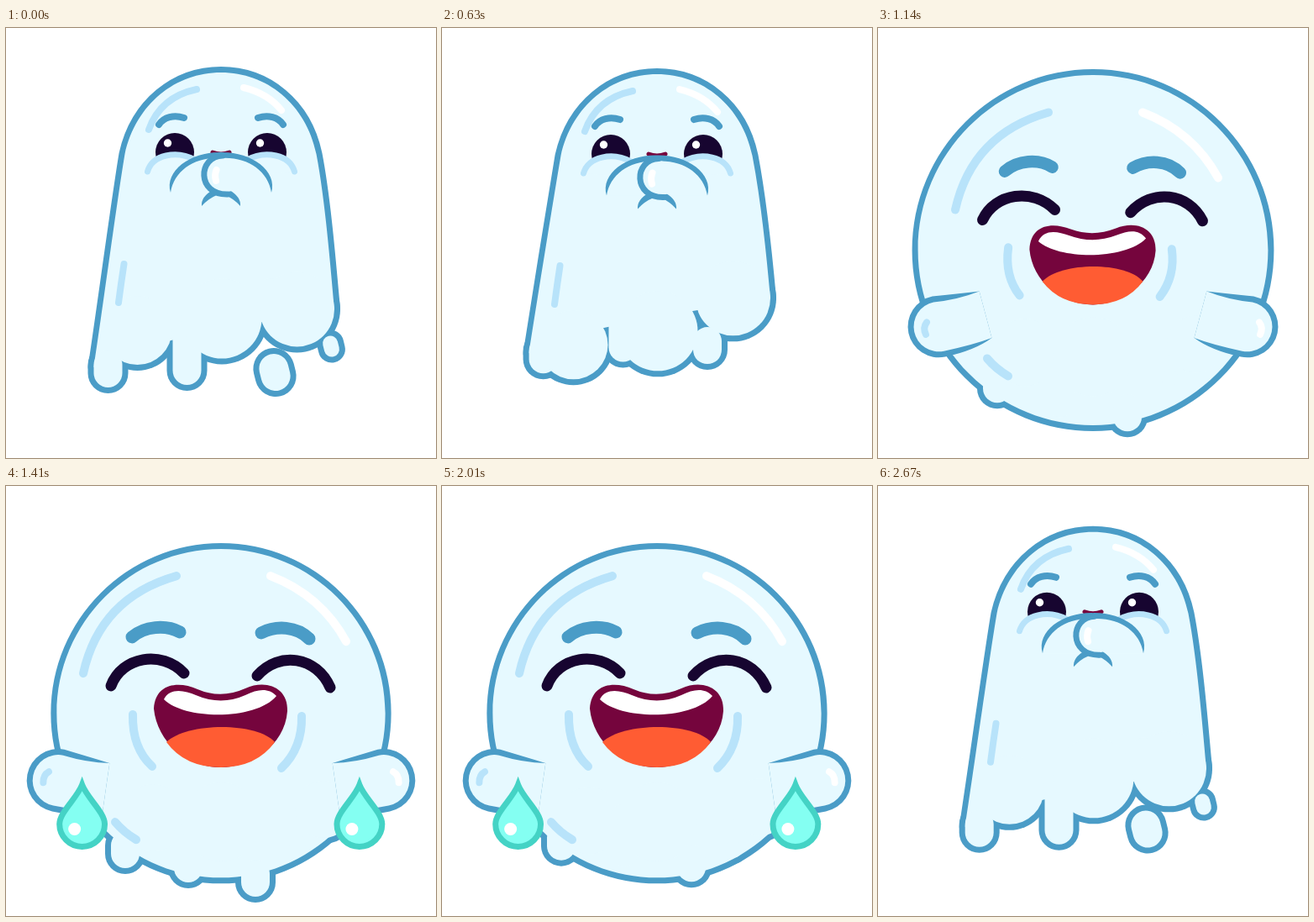
An HTML page with a canvas that plays this animation: 512 by 512 pixels, repeating every 2.7 s.

```html
<!DOCTYPE html>
<html lang="en">
<head>
<meta charset="utf-8">
<title>Giggling ghost</title>
<style>
html, body { margin: 0; width: 100%; height: 100%; overflow: hidden; background: #fff; }
canvas { display: block; width: 512px; height: 512px; }
</style>
</head>
<body>
<canvas id="stage" width="512" height="512"></canvas>
<script>
const ctx = document.getElementById('stage').getContext('2d');
const LOOP = 2700, LAUGH = 300;
const SKIN = '#e6f9ff', LINE = '#4a9cc7', SHADE = '#b8e3fa', INK = '#170530',
      WINE = '#75053d', TONGUE = '#ff5c33', WHITE = '#fff';

const lerp = (a, b, k) => a + (b - a) * k;
const smooth = k => k * k * (3 - 2 * k);
const ramp = (t, a, b) => smooth(Math.min(1, Math.max(0, (t - a) / (b - a))));

function track(t, times, values, ease = smooth) {
  if (t <= times[0]) return values[0];
  const i = times.findIndex(v => v > t);
  if (i < 0) return values[values.length - 1];
  return lerp(values[i - 1], values[i], ease((t - times[i - 1]) / (times[i] - times[i - 1])));
}

// Blend two path strings that share the same commands.
function mix(a, b, k) {
  const number = /-?[\d.]+/g, target = b.match(number);
  let i = 0;
  return a.replace(number, v => lerp(+v, +target[i++], k));
}

function stroke(path, color, width) {
  ctx.strokeStyle = color;
  ctx.lineWidth = width;
  ctx.stroke(new Path2D(path));
}
function fill(path, color) {
  ctx.fillStyle = color;
  ctx.fill(new Path2D(path));
}
function dot(x, y, r, color) {
  ctx.fillStyle = color;
  ctx.beginPath();
  ctx.arc(x, y, r, 0, 7);
  ctx.fill();
}
function at(x, y, draw) {
  ctx.save();
  ctx.translate(x, y);
  draw();
  ctx.restore();
}
function bothSides(draw) {
  draw(false);
  ctx.save();
  ctx.translate(512, 0);
  ctx.scale(-1, 1);
  draw(true);
  ctx.restore();
}

// Blobs of the melting hem: ghost x, radius, heights; ball x, radius, heights; neck length.
const HEM = [
  { g: [121.5, 17], gy: [411, 395, 390], b: [142, 17], by: [438, 430, 427], neck: 10 },
  { g: [156.5, 41], gy: [360, 367, 382], b: [175, 40], by: [395, 395, 402], neck: 0 },
  { g: [215.5, 17], gy: [408, 384, 374], b: [217, 17], by: [455, 440, 430], neck: 40 },
  { g: [257, 47.5], gy: [346, 373, 347], b: [256, 47], by: [400, 400, 400], neck: 0 },
  { g: [316, 17], gy: [325, 386, 377], b: [297, 17], by: [472, 457, 451], neck: 10 },
  { g: [346.5, 44.5], gy: [335, 322, 318], b: [378, 34], by: [385, 378, 388], neck: 0 }
];
const ghostY = (t, [a, b, c]) => track(t, [0, 360, 870, 2400], [a, b, c, a]);
const ballY = (t, ys) => track(t, [1410, 1800, 2250], ys);
const sag = bob => bob * .45;

function ghostPath(bob, left, right) {
  const top = 53 + bob, brow = 90 + bob, side = 150 + bob, x = 104.5 - sag(bob);
  return `M141.5 ${side} C155 ${brow} 202 ${top} 256 ${top} C310 ${top} 357 ${brow} 369.5 ${side}
    C380 ${side + 55} 386 ${right - 55} 391 ${right} C340 ${right + 10} 160 ${left - 41} ${x} ${left - 7}
    C${x + 9} ${left - 65} 133 ${side + 50} 141.5 ${side}`;
}
function ballPath(cy, r) {
  const p = (x, y) => `${256 + x * r} ${cy + y * r}`;
  return `M${p(-1, 0)} C${p(-1, -.552)} ${p(-.552, -1)} ${p(0, -1)} C${p(.552, -1)} ${p(1, -.552)} ${p(1, 0)}
    C${p(1, .265)} ${p(.895, .52)} ${p(.707, .707)} C${p(.317, 1.098)} ${p(-.317, 1.098)} ${p(-.707, .707)}
    C${p(-.895, .52)} ${p(-1, .265)} ${p(-1, 0)}`;
}

// All parts are outlined first and filled afterwards, so they merge into one silhouette.
function drawBody(t, s) {
  const hang = h => ghostY(t, h.gy) + s.bob;
  const blobs = HEM.map((h, i) => {
    const y = lerp(hang(h), ballY(t, h.by), s.ball);
    const x = lerp(h.g[0] - (i ? 0 : sag(s.bob)), h.b[0], s.ball);
    return { x1: x, y1: y - h.neck, x2: x, y2: y, r: lerp(h.g[1], h.b[1], s.ball) };
  });
  const drop = (x, y, r, len) => {
    if (r > 1) blobs.push({ x1: x - len * .25, y1: y - len, x2: x + len * .25, y2: y + len, r });
  };
  drop(320, track(t, [0, 260, 2460, 2700], [410, 434, 375, 410]),
       17.5 * track(t, [40, 260, 2430, 2600], [1, 0, 0, 1]), 4.5);
  drop(lerp(387, 347, s.ball),
       lerp(379, track(t, [1410, 1800, 2100], [425, 462, 425]), s.ball),
       lerp(9 * track(t, [20, 200, 600, 840], [1, 0, 0, 1]), 10, s.ball), 3.5 * (1 - s.ball));

  const body = mix(ghostPath(s.bob, hang(HEM[0]), hang(HEM[5])), ballPath(s.cy, s.r - 3.5), s.ball);
  const paintBlobs = (color, edge) => {
    ctx.strokeStyle = color;
    for (const b of blobs) {
      ctx.lineWidth = 2 * (b.r + edge);
      ctx.beginPath();
      ctx.moveTo(b.x1, b.y1);
      ctx.lineTo(b.x2, b.y2 + .01);
      ctx.stroke();
    }
  };
  stroke(body, LINE, 14);
  paintBlobs(LINE, 7);
  fill(body, SKIN);
  paintBlobs(SKIN, 0);
}

function drawShine(s) {
  const y = lerp(s.bob, (s.cy - 270.5) * .8, s.ball), width = lerp(8, 10, s.ball);
  at(0, y, () => {
    stroke(mix('M170 121 Q184 82 227 73', 'M92 223 Q112 133 203 107', s.ball), SHADE, width);
    stroke(mix('M283 71 Q312 78 328 98', 'M315 107 Q375 130 405 185', s.ball), WHITE, width);
    stroke(mix('M140.5 281 Q137 304 134 327', 'M130 400 Q140 412 155 421', s.ball), SHADE, width);
  });
}

const MOUTH = {
  lips: ['M176 265 C178 235 205 232 228 242 Q256 254 285 241 C310 230 336 240 335 268 C332 310 290 335 256 335 C215 335 180 305 176 265',
         'M194 296 C193 268 212 262 234 268 Q256 270 278 267 C302 260 317 272 317 292 C315 325 285 348 256 348 C222 348 196 325 194 296'],
  teeth: ['M188 254 C195 240 212 243 226 249 Q256 262 285 249 C300 242 312 240 322 250 C298 279 213 279 188 254',
          'M200 290 C203 275 215 272 232 277 Q256 280 280 276 C295 273 306 274 310 288 C285 303 225 304 200 290'],
  tongue: ['M191 305 C215 281 300 281 320 305 Q298 335 256 335 Q213 335 191 305',
           'M210 328 C225 305 285 305 301 328 Q285 348 256 348 Q228 348 210 328']
};

function drawFace(s) {
  const loud = (a, b) => mix(a, b, s.calm);
  const lift = (s.cos + .31) * (1 - s.calm) * s.ball;
  const browWidth = lerp(8, lerp(15, 13, s.calm), s.ball);
  at(0, s.bob * (1 - s.ball), () => {
    at(0, -5.3 * lift, () => {
      stroke(mix('M182 115 C188 106 200 103 212 107', loud('M150 180 C165 167 190 165 207 174', 'M154 188 C170 173 195 172 209 186'), s.ball), LINE, browWidth);
      stroke(mix('M300 107 C312 103 324 106 330 115', loud('M304 175 C322 166 346 167 361 182', 'M302 187 C317 173 341 173 356 189'), s.ball), LINE, browWidth);
    });

    if (s.ball < .4) {
      for (const x of [201, 311]) {
        dot(x, 148, 23, INK);
        dot(x - 8.5, 137, 4.7, WHITE);
      }
      bothSides(() => {
        const cheek = 'M168.5 171 C174 151 203 145 225 157';
        fill(cheek + ' L228 176 Z', SKIN);
        stroke(cheek, SHADE, 7);
      });
      stroke('M246 148 Q256 152 266 148', WINE, 5);
      return;
    }
    at(0, -2.6 * lift, () => {
      stroke(loud('M125 238 C138 203 185 195 212 223', 'M123 240 C143 217 182 215 206 237'), INK, 13);
      stroke(loud('M299 226 C325 196 370 203 386 240', 'M306 241 C329 217 368 215 388 239'), INK, 13);
    });
    at(0, -4 * lift, () => {
      stroke(loud('M151 272 Q150 312 174 334', 'M168 272 Q152 287 152 314'), SHADE, 10);
      stroke(loud('M352 274 Q353 312 328 336', 'M343 274 Q358 289 359 314'), SHADE, 10);
    });
  });

  if (s.ball >= .4) {
    const grow = ramp(s.ball, .3, 1);
    at(256, lerp(180, 300, grow), () => {
      ctx.scale(grow, grow);
      ctx.translate(-256, -300);
      fill(loud(...MOUTH.lips), WINE);
      fill(loud(...MOUTH.teeth), WHITE);
      fill(loud(...MOUTH.tongue), TONGUE);
    });
  }
}

function drawCoveringHands(s) {
  at(0, s.bob * 1.75, () => {
    fill('M196 196 C195 167 222 149 256 149 C290 149 317 167 316 196 Z', SKIN);
    bothSides(() => {
      fill('M196 196 C188 169 222 147 256 148 L256 155 C225 153 200 170 196 196 Z', LINE);
      fill('M233 212 Q232 201 246 193 L251 199 Q241 203 233 212 Z', LINE);
    });
    fill('M256 154 C229 155 229 194 256 197 L277 192 L277 158 Z', SKIN);
    stroke('M258 152 C228 153 227 199 264 198', LINE, 7);
    stroke('M250.5 169 Q248 175 250 182', WHITE, 8);
  });
}

function drawArms(s) {
  const pose = (laugh, calm, ghost) => lerp(ghost, lerp(laugh, calm, s.calm), s.ball);
  const x = pose(63.5 + 4.5 * s.cos, 95, 215);
  const y = pose(361 + 36 * s.cos, 338, 185);
  const angle = pose(-1.5 - 43.5 * s.cos, 0, -20) * Math.PI / 180;
  const r = pose(34, 31, 22);
  // Both contours share their inner end points, so the outline tapers there.
  const arm = R => `M56 ${2 - r} Q30 ${3 - R} 0 ${-R} A${R} ${R} 0 0 0 0 ${R} Q36 ${R} 59 ${r - 7} Z`;
  bothSides(right => at(x, y, () => {
    ctx.rotate(angle);
    fill(arm(r + 3.5), LINE);
    fill(arm(r - 3.5), SKIN);
    stroke('M-17 6 Q-19 -3 -13 -8', right ? WHITE : SHADE, 8);
  }));
}

function drawTears(t) {
  const linear = k => k;
  for (const start of [1155, 1455, 1755]) {
    const age = t - start, times = [0, 45, 255, 345, 440];
    if (age <= 0 || age >= 440) continue;
    const x = track(age, times, [122, 117, 90.5, 101, 108], linear);
    const y = track(age, times, [254, 263, 401, 446, 482], linear);
    const size = track(age, times, [0, .22, 1, .77, .2], linear);
    const tilt = .8 * (1 - ramp(age, 30, 220));
    for (const side of [1, -1]) at(side > 0 ? x : 511.5 - x, y, () => {
      const tear = 'M0 -46 C6 -30 27 -13 27 1 A27 27 0 1 1 -27 1 C-27 -13 -6 -30 0 -46 Z';
      ctx.scale(size, size);
      ctx.rotate(side * tilt);
      ctx.lineJoin = 'miter';
      fill(tear, '#84fff2');
      stroke(tear, '#44d3c5', 7);
      ctx.lineJoin = 'round';
      dot(-9, 7, 7.5, WHITE);
    });
  }
}

function draw(t) {
  const phase = t / LAUGH * 2 * Math.PI;
  const cos = Math.cos(phase), sin = Math.sin(phase);
  const calm = 1 - ramp(t, 1080, 1170) + ramp(t, 2130, 2250);
  const burst = Math.sin(Math.PI * Math.min(1, Math.max(0, (t - 1080) / 210))) ** 2;
  const state = {
    cos, calm,
    ball: ramp(t, 930, 1080) - ramp(t, 2280, 2460),
    bob: 10 * (1 - cos),
    cy: lerp(270 + 6 * cos - 2.5 * sin, 270, calm),
    r: lerp(202 + 3 * sin, 195, calm) + 22 * burst
  };
  ctx.fillStyle = WHITE;
  ctx.fillRect(0, 0, 512, 512);
  ctx.lineCap = ctx.lineJoin = 'round';
  at(0, -14 * burst, () => {
    drawBody(t, state);
    drawShine(state);
    drawFace(state);
    if (state.ball < .4) drawCoveringHands(state);
    else drawArms(state);
    drawTears(t);
  });
}

function tick() {
  draw(performance.now() % LOOP);
  requestAnimationFrame(tick);
}
tick();
</script>
</body>
</html>
```
